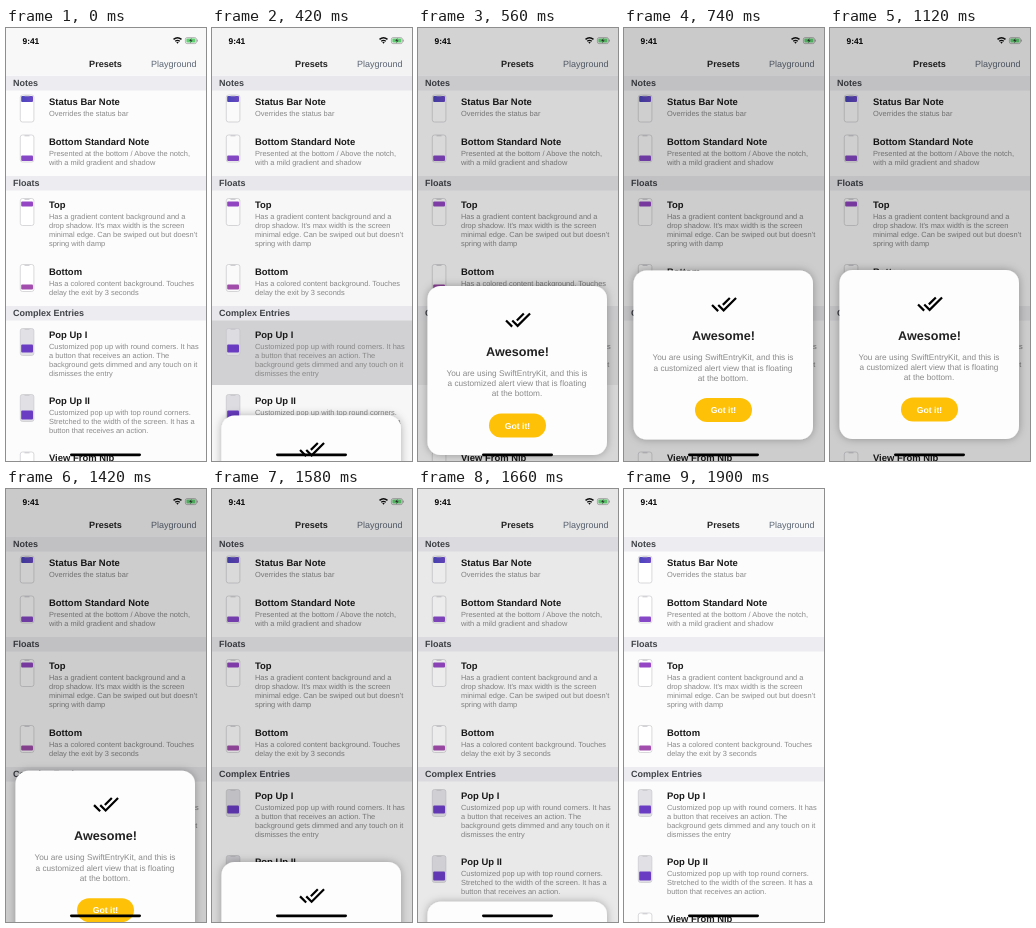
These frames come from a looping animation (200x433 px, 1.94 s). An HTML page:

```html
<!DOCTYPE html>
<html lang="en">
<head>
<meta charset="utf-8">
<title>Presets</title>
<style>
  html, body { margin: 0; width: 100%; height: 100%; overflow: hidden; background: #fff; }
  svg { display: block; width: 100vw; height: 100vh; }
  text { font-family: "Liberation Sans", Arial, sans-serif; white-space: pre; text-rendering: geometricPrecision; }
  .bold { font-weight: 700; }
  .mid { text-anchor: middle; }
</style>
</head>
<body>
<svg viewBox="0 0 200 433">
  <defs>
    <filter id="shadow" x="-20%" y="-20%" width="140%" height="140%">
      <feDropShadow dx="0" dy="0" stdDeviation="4" flood-opacity=".3"/>
    </filter>
    <linearGradient id="violet">
      <stop stop-color="#4a46bc"/><stop offset="1" stop-color="#6a48c6"/>
    </linearGradient>
  </defs>

  <rect width="200" height="433" fill="#fcfcfd"/>
  <rect id="pressed" y="292" width="200" height="65" fill="#d5d5d8"/>
  <g id="list"></g>

  <rect width="200" height="47.5" fill="#f8f8f9"/>
  <text class="bold" x="16.5" y="16.3" font-size="8.4">9:41</text>
  <g id="status">
    <path d="M167.5 11.4Q171.5 8 175.5 11.4M169.2 13.3Q171.5 11.4 173.8 13.3"
      fill="none" stroke="#111" stroke-width="1.4"/>
    <path d="M170.3 14.3Q171.5 13.4 172.7 14.3L171.5 15.8Z" fill="#111"/>
    <rect x="179.4" y="9.6" width="11" height="6" rx="1.7" fill="none" stroke="#999" stroke-width=".7"/>
    <rect x="180.4" y="10.6" width="9" height="4" rx=".8" fill="#5fd070"/>
    <path d="M185.6 9.9l-2.4 3h1.6l-.6 2.4 2.4-3h-1.6z" fill="#333"/>
    <path d="M191.5 11.6v2" stroke="#999" stroke-width=".8"/>
  </g>
  <text class="bold mid" x="99.5" y="39" font-size="9.1" fill="#222">Presets</text>
  <text x="145" y="39" font-size="9" fill="#5c6674">Playground</text>

  <rect id="dim" width="200" height="433"/>

  <g id="popup">
    <rect x="9.5" y="242" width="179.5" height="169" rx="13" fill="#fdfdfd" filter="url(#shadow)"/>
    <path transform="translate(86.8 262.5) scale(1.1)"
      d="M18 7l-1.41-1.41-6.34 6.34 1.41 1.41L18 7zm4.24-1.41L11.66 16.17 7.48 12l-1.41 1.41L11.66 19l12-12-1.42-1.41zM.41 13.41L6 19l1.41-1.41L1.83 12 .41 13.41z"/>
    <text class="bold mid" x="99.5" y="311.5" font-size="12.6" fill="#222">Awesome!</text>
    <g class="mid" font-size="8.25" fill="#8a8a8a">
      <text x="99" y="331.8">You are using SwiftEntryKit, and this is</text>
      <text x="99" y="342.1">a customized alert view that is floating</text>
      <text x="99" y="352.4">at the bottom.</text>
    </g>
    <rect x="71" y="369.5" width="57" height="24" rx="12" fill="#ffc107"/>
    <text class="bold mid" x="99.5" y="384.5" font-size="8.6" fill="#fff">Got it!</text>
  </g>

  <rect x="64" y="425.4" width="71" height="2.8" rx="1.4"/>
</svg>
<script>
const $ = id => document.getElementById(id);

const sections = [[48, "Notes"], [148, "Floats"], [278, "Complex Entries"]];

// title baseline, title, description lines, phone top, block offset, block height, block colour, phone fill
const rows = [
  [77, "Status Bar Note", ["Overrides the status bar"], 67, 1, 6, "url(#violet)", "#fff"],
  [117, "Bottom Standard Note",
    ["Presented at the bottom / Above the notch,", "with a mild gradient and shadow"],
    107, 20.5, 5.5, "#8748c8", "#fff"],
  [180, "Top",
    ["Has a gradient content background and a", "drop shadow. It's max width is the screen",
     "minimal edge. Can be swiped out but doesn't", "spring with damp"],
    170.5, 3, 5, "#9446c4", "#fff"],
  [246.5, "Bottom",
    ["Has a colored content background. Touches", "delay the exit by 3 seconds"],
    236.5, 20, 5, "#a24eae", "#fff"],
  [310, "Pop Up I",
    ["Customized pop up with round corners. It has", "a button that receives an action. The",
     "background gets dimmed and any touch on it", "dismisses the entry"],
    300.5, 16, 8, "#6a3cc4", "#e0e0e5"],
  [376.3, "Pop Up II",
    ["Customized pop up with top round corners.", "Stretched to the width of the screen. It has a",
     "button that receives an action."],
    366.5, 16, 9, "#6a3cc4", "#e0e0e5"],
  [433, "View From Nib", [], 424, 12, 8, "#6a3cc4", "#fff"]
];

const text = (x, y, size, fill, str, cls = "") =>
  `<text class="${cls}" x="${x}" y="${y}" font-size="${size}" fill="${fill}">${str}</text>`;

const section = ([y, name]) =>
  `<rect y="${y}" width="200" height="14.5" fill="#ededf1"/>` +
  text(7, y + 10.3, 9, "#3f4247", name, "bold");

const row = ([y, title, lines, top, offset, height, colour, fill]) =>
  `<rect x="14.3" y="${top}" width="13.6" height="27" rx="2.2" fill="${fill}" stroke="#c9c9cd" stroke-width=".7"/>
   <rect x="15.2" y="${top + offset}" width="11.8" height="${height}" rx="1" fill="${colour}"/>
   <path d="M18.5 ${top + .8}h5" stroke="#c9c9cd"/>` +
  text(43, y, 9.45, "#1a1a1a", title, "bold") +
  lines.map((line, i) => text(43, y + 11 + i * 9, 7.45, "#8a8a8a", line)).join("");

$("list").innerHTML = sections.map(section).join("") + rows.map(row).join("");

const LOOP = 1940, ENTER = 378, EXIT = 1279, TRAVEL = 195;

const smooth = (t, from, to) => {
  const x = Math.min(1, Math.max(0, (t - from) / (to - from)));
  return x * x * (3 - 2 * x);
};

// critically damped spring, from 1 to 0
const spring = t => {
  const x = Math.max(0, t - ENTER) * 0.0226;
  return (1 + x) * Math.exp(-x);
};

function draw(now) {
  const t = now % LOOP;
  const drop = TRAVEL * (spring(t) + smooth(t, EXIT, EXIT + 490));
  $("popup").setAttribute("transform", `translate(0 ${drop})`);
  $("popup").style.display = t < ENTER || t > EXIT + 490 ? "none" : "";
  $("dim").setAttribute("opacity", 0.19 * (smooth(t, 370, 640) - smooth(t, 1480, 1800)));
  $("pressed").setAttribute("opacity", t < 300 ? 0 : 1 - smooth(t, 430, 650));
  $("status").style.display = t < 1880 ? "" : "none";
  requestAnimationFrame(draw);
}
requestAnimationFrame(draw);
</script>
</body>
</html>
```
